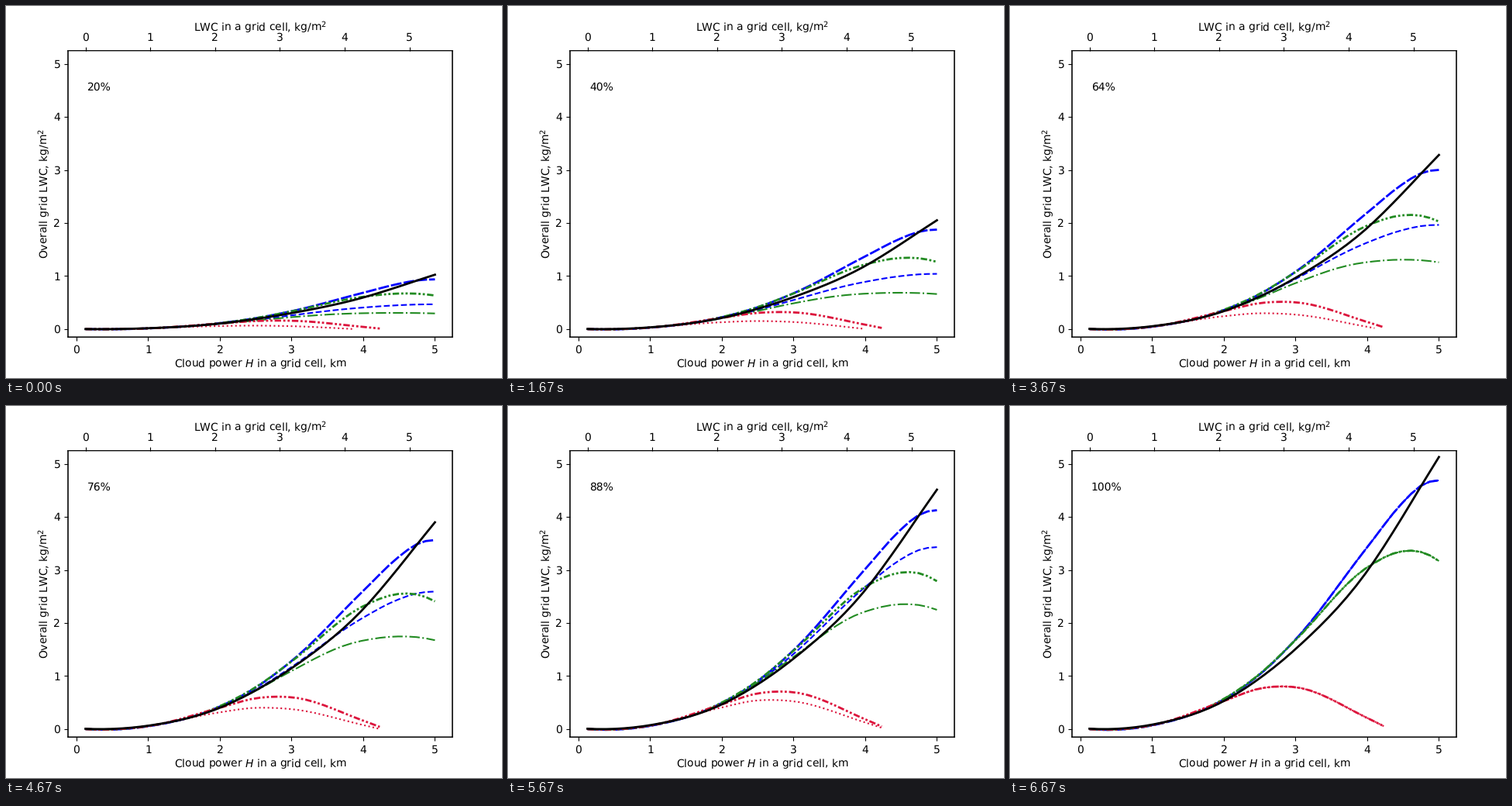
A matplotlib script that plays this animation: 640x480 px, repeating every 7 s.

```python
import numpy as np
import matplotlib.pyplot as plt
from matplotlib.animation import FuncAnimation

plt.rcParams.update({"font.family": "DejaVu Sans", "path.snap": False,
                     "text.hinting": "none"})

FRAMES = 21
LOOP_MS = 7000
H = np.linspace(0.125, 5, 39)
KNOTS = np.array([0.125, 1, 2, 2.5, 3, 4, 4.5, 4.75, 5])


def smooth(*y):
    """Cubic Hermite curve through the values at KNOTS, sampled on H."""
    y = np.array(y)
    slope = np.gradient(y, KNOTS, edge_order=2)
    i = np.clip(np.searchsorted(KNOTS, H, side="right") - 1, 0, len(y) - 2)
    w = KNOTS[i + 1] - KNOTS[i]
    t = (H - KNOTS[i]) / w
    return ((1 + 2 * t) * (1 - t) ** 2 * y[i] + t * (1 - t) ** 2 * w * slope[i]
            + t * t * (3 - 2 * t) * y[i + 1] + t * t * (t - 1) * w * slope[i + 1])


def mixed_depth(cover, depth):
    """Apparent optical depth of a partly covered grid."""
    return -np.log(1 - cover * (1 - np.exp(-depth)))


# Water content under full cover: true value, then three retrievals
true_lwc = smooth(0.008, 0.085, 0.53, 0.96, 1.51, 2.98, 4.02, 4.58, 5.13)
blue_lwc = smooth(0, 0.07, 0.56, 1.03, 1.69, 3.43, 4.28, 4.59, 4.69)
green_lwc = smooth(0, 0.075, 0.57, 1.04, 1.68, 3.05, 3.355, 3.34, 3.17)
red_lwc = smooth(0, 0.075, 0.53, 0.765, 0.79, 0.21, -0.13, -0.3, -0.5)

# Water content per unit of optical depth; red saturates with cloud power
blue_scale = 2.535
green_scale = 1.68 - 0.0011 * H ** 3
red_depth = 2.75 / (1 + np.exp(-1.9 * (H - 1.95)))
red_scale = red_lwc / red_depth

fig, ax = plt.subplots(figsize=(6.4, 4.8), dpi=100)
ax.set_xlim(-0.11875, 5.24375)
ax.set_ylim(-0.15, 5.25)
ax.set_xlabel("Cloud power $H$ in a grid cell, km", labelpad=2)
ax.set_ylabel("Overall grid LWC, kg/m$^2$", labelpad=1.5)

top = ax.twiny()
top.set_xlim(-0.2697, 5.6637)
top.set_xlabel("LWC in a grid cell, kg/m$^2$", labelpad=2)


def line(color, style, width):
    return ax.plot([], [], color=color, linestyle=style, linewidth=width)[0]


dash_dot_dot = (0, (3, 1, 1, 1, 1, 1))
blue_thick = line("blue", (0, (5, 1)), 2)
blue_thin = line("blue", "--", 1.5)
green_thick = line("forestgreen", dash_dot_dot, 2)
green_thin = line("forestgreen", "-.", 1.5)
red_thick = line("crimson", dash_dot_dot, 2)
red_thin = line("crimson", ":", 1.5)
black = line("black", "-", 2)
label = ax.text(0.15, 4.5, "")


def set_curve(curve, y):
    """Show a curve up to the point where thick cloud reads negative."""
    keep = (y > 0) | (H < 2)
    curve.set_data(H[keep], y[keep])


def update(i):
    percent = 20 + 4 * i
    k = percent / 100
    label.set_text(f"{percent}%")
    set_curve(black, k * true_lwc)
    set_curve(blue_thick, k * blue_lwc)
    set_curve(green_thick, k * green_lwc)
    set_curve(red_thick, k * red_lwc)
    set_curve(blue_thin, blue_scale * mixed_depth(k, blue_lwc / blue_scale))
    set_curve(green_thin, green_scale * mixed_depth(k, green_lwc / green_scale))
    bias = 0.16 * k * (1 - k) ** 1.3 * (H / 4) ** 3
    set_curve(red_thin, red_scale * mixed_depth(k, red_depth) - bias)
    return black, label


anim = FuncAnimation(fig, update, frames=FRAMES, interval=LOOP_MS / FRAMES,
                     repeat=True, repeat_delay=0, blit=False)
plt.show()
```
